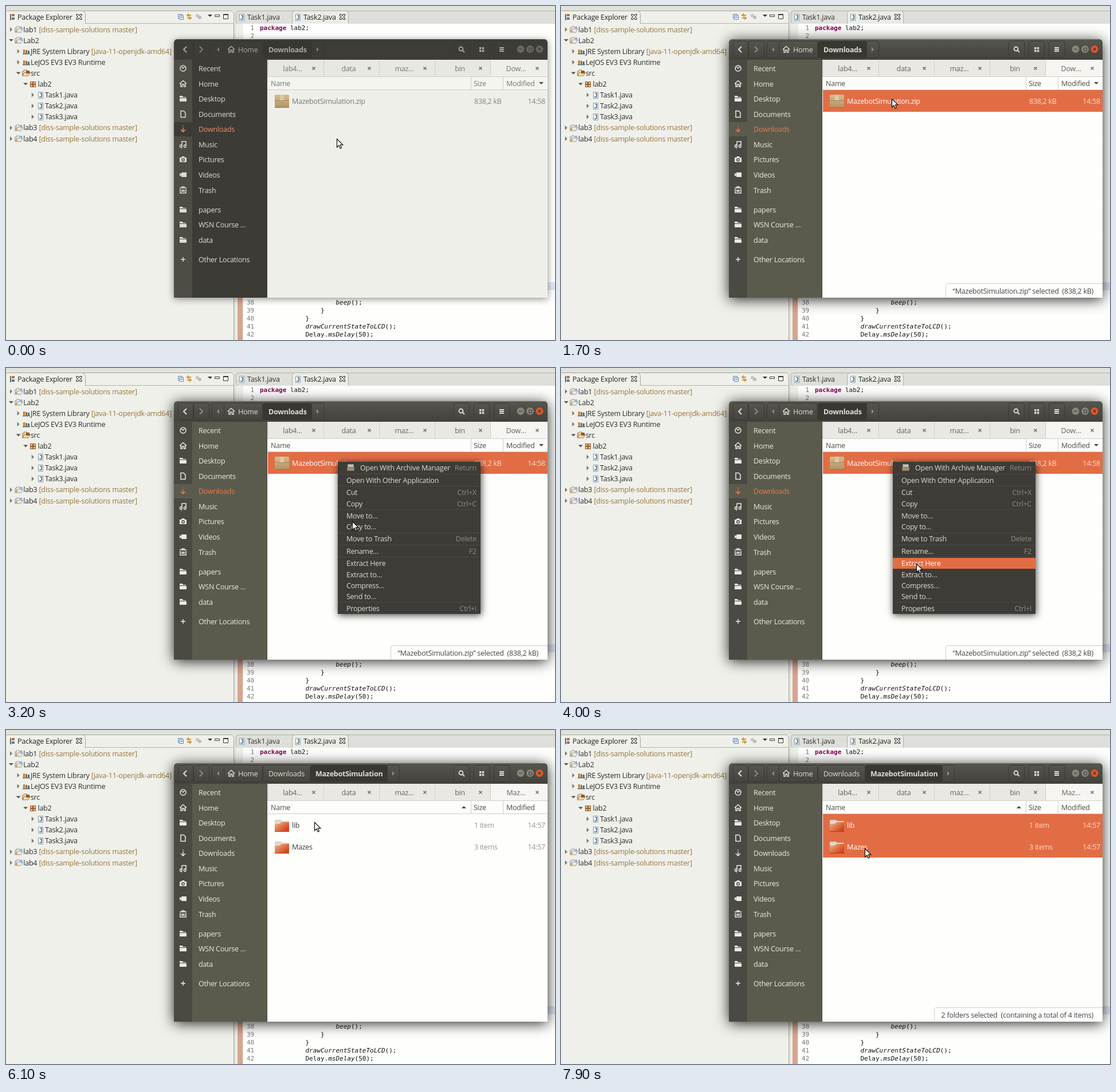
Write an HTML page with a canvas that moves like this. It is 958x584 px and loops after 8000 ms.

```html
<!DOCTYPE html>
<html lang="en">
<head>
<meta charset="utf-8">
<title>Extracting an archive</title>
<style>
html, body { margin: 0; width: 100%; height: 100%; overflow: hidden; background: #e2e2dd; }
canvas { display: block; }
</style>
</head>
<body>
<canvas id="stage" width="958" height="584"></canvas>
<script>
const ctx = document.getElementById('stage').getContext('2d');
const LOOP = 8000, STEP = 100, ORANGE = '#e26d45';

// Pointer path: time, x, y
const POINTER = [
  [200, 577, 232], [400, 577, 245], [500, 577, 245], [800, 531, 212], [1200, 577, 162],
  [2700, 577, 162], [3000, 592, 245], [3100, 592, 245], [3200, 604, 268], [3600, 620, 354],
  [3700, 620, 354], [3800, 620, 342], [4600, 620, 342], [5000, 547, 205], [5100, 547, 205],
  [5400, 545, 166], [6000, 545, 166], [6100, 538, 161], [6600, 508, 167], [6800, 508, 167],
  [7100, 530, 212], [7300, 530, 212], [7500, 530, 207]
];

// Icon outlines around their centre; the second entry marks filled ones
const ICONS = {
  clock: ['M5 0A5 5 0 1 1-5 0 5 5 0 1 1 5 0M-2.5-2.5 0 0 2.5-2.5'],
  home: ['M-6 0 0-5.5 6 0M-4-1V5H-1.5V1H1.5V5H4V-1'],
  folder: ['M-6-5H-1L0-3H5V-2H-6ZM-6-1H6V5H-6Z', 1],
  doc: ['M-4-5.5H1L4-2.5V5.5H-4Z'],
  down: ['M0-6V-4.5M0-2.5V4M-4 1 0 5 4 1'],
  music: ['M-2 3A1.8 1.8 0 1 1-5.5 3 1.8 1.8 0 1 1-2 3V-5H5V3A1.8 1.8 0 1 1 1.5 3 1.8 1.8 0 1 1 5 3'],
  camera: ['M-6-3H-3L-2-5H2L3-3H6V5H-6ZM3 1A3 3 0 1 0-3 1 3 3 0 1 0 3 1M1.5 1A1.5 1.5 0 1 0-1.5 1 1.5 1.5 0 1 0 1.5 1', 1],
  video: ['M-3-4H6V4H-3V1L-6 3V-3L-3-1Z', 1],
  trash: ['M-6-4H6M-2-4V-6H2V-4M-5-2V5H5V-2M-2-1V3M0-1V3M2-1V3'],
  plus: ['M-4 0H4M0-4V4'],
  search: ['M2.5-1A3.5 3.5 0 1 1-4.5-1 3.5 3.5 0 1 1 2.5-1M1.5 1.5 5 5'],
  grid: ['M-4-4h3.4v3.4h-3.4zM.8-4h3.4v3.4h-3.4zM-4 .8h3.4v3.4h-3.4zM.8.8h3.4v3.4h-3.4z', 1],
  menu: ['M-4-3H4M-4 0H4M-4 3H4'],
  back: ['M2-5-3 0 2 5'],
  next: ['M-2-5 3 0-2 5'],
  left: ['M2-4-2 0 2 4Z', 1],
  right: ['M-2-4 2 0-2 4Z', 1],
  up: ['M-4 2 0-2 4 2Z', 1],
  drop: ['M-4-2 0 2 4-2Z', 1],
  cross: ['M-2.5-2.5 2.5 2.5M2.5-2.5-2.5 2.5'],
  closeTab: ['M-4.5-4.5H-2L0-2.2 2-4.5H4.5V-2.5L2.2 0 4.5 2.5V4.5H2L0 2.2-2 4.5H-4.5V2.5L-2.2 0-4.5-2.5Z'],
  project: ['M-6 5V-3H-4L-3-5H1L2-3H5V-1M-6 5-3-1H7L4 5Z'],
  pointer: ['M0 0V14.5L3.4 11.3 5.6 16.5 8 15.5 5.8 10.4H10.4Z', 1]
};
for (const k in ICONS) ICONS[k][0] = new Path2D(ICONS[k][0]);

const SIDEBAR = [
  ['clock', 'Recent', 109], ['home', 'Home', 136], ['folder', 'Desktop', 162], ['doc', 'Documents', 189],
  ['down', 'Downloads', 215], ['music', 'Music', 242], ['camera', 'Pictures', 268], ['video', 'Videos', 295],
  ['trash', 'Trash', 322], ['folder', 'papers', 356], ['folder', 'WSN Course …', 382], ['folder', 'data', 409],
  ['plus', 'Other Locations', 443]
];

const MENU = [
  ['Open With Archive Manager', 174, 'Return'], ['Open With Other Application', 196], ['Cut', 217, 'Ctrl+X'],
  ['Copy', 237, 'Ctrl+C'], ['Move to…', 258], ['Copy to…', 277], ['Move to Trash', 298, 'Delete'],
  ['Rename…', 320, 'F2'], ['Extract Here', 341], ['Extract to…', 361], ['Compress…', 380],
  ['Send to…', 399], ['Properties', 420, 'Ctrl+I']
];

const BRANCH = '[diss-sample-solutions master]';
// depth, kind, open, label, suffix
const TREE = [
  [0, 'project', 0, 'lab1', BRANCH], [0, 'project', 1, 'Lab2'],
  [1, 'library', 0, 'JRE System Library', '[java-11-openjdk-amd64]'], [1, 'library', 0, 'LeJOS EV3 EV3 Runtime'],
  [1, 'source', 1, 'src'], [2, 'package', 1, 'lab2'],
  [3, 'java', 0, 'Task1.java'], [3, 'java', 0, 'Task2.java'], [3, 'java', 0, 'Task3.java'],
  [0, 'project', 0, 'lab3', BRANCH], [0, 'project', 0, 'lab4', BRANCH]
];

function rect(x, y, w, h, fill) {
  ctx.fillStyle = fill;
  ctx.fillRect(x, y, w, h);
}

function frame(x, y, w, h, stroke, fill, radius = 0) {
  ctx.beginPath();
  ctx.roundRect(x + .5, y + .5, w - 1, h - 1, radius);
  if (fill) { ctx.fillStyle = fill; ctx.fill(); }
  ctx.lineWidth = 1;
  ctx.strokeStyle = stroke;
  ctx.stroke();
}

function disc(x, y, r, fill) {
  ctx.fillStyle = fill;
  ctx.beginPath();
  ctx.arc(x, y, r, 0, 7);
  ctx.fill();
}

function fade(y0, y1, top, bottom) {
  const g = ctx.createLinearGradient(0, y0, 0, y1);
  g.addColorStop(0, top);
  g.addColorStop(1, bottom);
  return g;
}

function setFont(align = 'left', weight = '') {
  ctx.font = weight + ' 12.5px "Open Sans", sans-serif';
  ctx.letterSpacing = '-0.25px';
  ctx.textAlign = align;
}

// Text centred vertically on y
function text(s, x, y, fill, align, weight) {
  setFont(align, weight);
  ctx.fillStyle = fill;
  ctx.fillText(s, x, y + 4.5);
  return ctx.measureText(s).width;
}

function code(s, x, y, fill = '#111', style = '') {
  ctx.font = style + ' 11px "DejaVu Sans Mono", monospace';
  ctx.letterSpacing = '0px';
  ctx.textAlign = 'left';
  ctx.fillStyle = fill;
  ctx.fillText(s, x, y + 4);
  return x + ctx.measureText(s).width;
}

function icon(name, x, y, color, width = 1.4) {
  const [path, filled] = ICONS[name];
  ctx.save();
  ctx.translate(x, y);
  ctx.fillStyle = ctx.strokeStyle = color;
  ctx.lineWidth = width;
  if (filled) ctx.fill(path, 'evenodd'); else ctx.stroke(path);
  ctx.restore();
}

function treeIcon(kind, x, y) {
  if (kind === 'java') {
    frame(x - 4, y - 6, 9, 12, '#8b98a2', '#fbfcfa');
    code('J', x - 2.5, y, '#39658f', 'bold');
  } else if (kind === 'package') {
    rect(x - 5, y - 5, 10, 10, '#9a5a2c');
    for (let i = 0; i < 4; i++) rect(x - 4 + i % 2 * 5, y - 4 + (i >> 1) * 5, 3, 3, '#e6bd8b');
  } else if (kind === 'library') {
    ['#c08137', '#a06a35', '#3f7486'].forEach((c, i) => rect(x - 5 + i * 4, y - 3 + i, 3, 8 - i, c));
    rect(x - 6, y + 4, 13, 1.5, '#5f6f7c');
  } else if (kind === 'source') {
    icon('project', x, y, '#a9702e', 1.2);
    rect(x - 2, y, 7, 4, '#f3d79b');
    rect(x, y - 4, 6, 5, '#8d5930');
  } else {
    icon('project', x, y, '#8b93a0', 1.1);
    rect(x - 2, y, 7, 4, '#e6ebf0');
    rect(x - 6, y + 1, 4, 4, '#d9a45a');
    rect(x + 3, y - 5, 3, 3, '#86a6d0');
  }
}

function drawExplorer() {
  rect(0, 8, 398, 576, '#f0f0eb');
  frame(-1, 8, 399, 600, '#a5a59f', '', 5);
  rect(138, 30, 259, 1, '#b5b5ae');
  frame(-5, 8, 144, 40, '#a5a59f', '#f0f0eb', 6);
  rect(1, 31, 396, 18, '#f0f0eb');
  rect(7, 14, 2, 11, '#666');
  rect(10, 14, 5, 4, '#b07432');
  rect(10, 20, 5, 4, '#5276a8');
  text('Package Explorer', 20, 19.5, '#222');
  icon('closeTab', 127.5, 19, '#333', 1.1);

  frame(300, 14, 8, 8, '#5c86b5', '#fff');
  frame(302, 16, 8, 8, '#5c86b5', '#e8f1fb');
  rect(304, 19, 4, 1, '#285a92');
  icon('left', 317, 16, '#cf9a32');
  icon('right', 322, 21, '#cf9a32');
  rect(315, 15, 8, 2, '#cf9a32');
  rect(316, 20, 8, 2, '#cf9a32');
  disc(334, 17, 3, '#c6c6c6');
  disc(338, 20, 3, '#bcb8cb');
  icon('drop', 356, 17, '#333');
  frame(364, 15, 9, 4, '#333', '#fff');
  frame(379, 14, 9, 9, '#333', '#fff');
  rect(379, 14, 9, 2, '#333');

  TREE.forEach(([depth, kind, open, label, suffix], i) => {
    const x = 9 + depth * 12.6, y = 41 + i * 19.1;
    icon(open ? 'drop' : 'right', x, y, open ? '#55554e' : '#77776e');
    treeIcon(kind, Math.round(x + 13), Math.round(y));
    const w = text(label, x + 21.3, y, '#2b2b2b');
    if (suffix) text(suffix, x + 24.5 + w, y, '#94783c');
  });
}

function drawEditor() {
  rect(401, 8, 557, 576, '#fefefc');
  rect(401, 8, 557, 23, '#dedfda');
  frame(401, 8, 600, 24, '#b0b0aa', '', 5);
  frame(499, 8, 99, 30, '#b0b0aa', '#ecece6', 5);
  rect(402, 31, 556, 10, '#fefefc');
  treeIcon('java', 411, 20);
  text('Task1.java', 421, 19.5, '#333');
  treeIcon('java', 509, 20);
  text('Task2.java', 519, 19.5, '#222');
  icon('closeTab', 587, 19, '#333', 1.1);

  rect(401, 31, 13, 553, '#efefea');
  rect(404, 80, 9, 504, '#dba994');
  for (let y = 81; y < 584; y += 3) rect(404, y, 9, 1, '#cf9a85');
  rect(414, 483, 544, 14, '#dfe7f2');
  [1, 2, 38, 39, 40, 41, 42].forEach(n => {
    const y = n < 3 ? 24 + n * 14 : 518 + (n - 38) * 14;
    code(String(n).padStart(2), 420, y, '#787878');
  });
  code(' lab2;', code('package', 443, 38, '#7f0055', 'bold'), 38);
  const col = n => 443 + n * 6.62;
  code('();', code('beep', col(20), 518, '#111', 'italic'), 518);
  code('}', col(16), 532);
  code('}', col(12), 546);
  code('();', code('drawCurrentStateToLCD', col(12), 560, '#111', 'italic'), 560);
  code('(50);', code('msDelay', code('Delay.', col(12), 574), 574, '#111', 'italic'), 574);
  code('}', col(8), 588);
}

function fileIcon(folder, x, y) {
  const shape = (sx, sy, w, h, fill) => {
    ctx.beginPath();
    ctx.roundRect(sx, sy, w, h, 2);
    ctx.fillStyle = fill;
    ctx.fill();
  };
  if (folder) {
    shape(x + 1, y - 9, 12, 8, '#d8cdbf');
    shape(x + 1, y - 7, 25, 12, '#e3d9cb');
    const front = ctx.createLinearGradient(x, y - 5, x + 14, y + 14);
    front.addColorStop(0, '#efb98f');
    front.addColorStop(1, '#d1481f');
    ctx.beginPath();
    ctx.moveTo(x + 1, y - 2);
    ctx.lineTo(x + 10, y - 2);
    ctx.lineTo(x + 13, y - 5);
    ctx.lineTo(x + 26, y - 5);
    ctx.lineTo(x + 26, y + 12);
    ctx.lineTo(x + 1, y + 12);
    ctx.fillStyle = front;
    ctx.fill();
    rect(x + 1, y + 11, 25, 1, '#b23d1c');
  } else {
    shape(x + 1, y - 11, 25, 23, fade(y - 11, y + 12, '#d2bb95', '#b5935f'));
    rect(x + 1, y - 1, 25, 1, '#a3845a');
    rect(x + 10, y - 11, 7, 10, '#dcc8a4');
    rect(x + 1, y + 11, 25, 1, '#94744a');
  }
}

function drawTitle(focus, inside) {
  ctx.save();
  ctx.shadowColor = focus ? 'rgba(0,0,0,.85)' : 'rgba(0,0,0,.45)';
  ctx.shadowBlur = focus ? 24 : 13;
  ctx.shadowOffsetY = focus ? 3 : 2;
  ctx.fillStyle = focus ? fade(58, 94, '#56554e', '#42413c') : '#3d3c37';
  ctx.beginPath();
  ctx.roundRect(293, 58, 652, 452, [6, 6, 0, 0]);
  ctx.fill();
  ctx.restore();
  rect(298, 58, 642, 1, focus ? '#6b6a62' : '#4a4943');

  const ink = focus ? '#e2ded5' : '#a9a79e', dim = focus ? '#8e8d84' : '#7d7c74';
  const edge = focus ? '#3a3934' : '#373632';
  const button = (x, w, active) => frame(x, 61, w, 30, edge, active ? '#383732' : focus ? fade(61, 91, '#55544d', '#45443e') : '', 3);
  button(300, 27);
  button(327, 28);
  button(359, 22);
  button(380, 68);
  button(448, inside ? 83 : 86, !inside);
  if (inside) button(531, 135, true);
  const end = inside ? 665 : 533;
  button(end, 22);
  icon('back', 313, 76, ink, 2);
  icon('next', 340, 76, dim, 2);
  icon('left', 370, 76, dim);
  icon('home', 393, 76, ink);
  text('Home', 405, 76, ink);
  text('Downloads', 458, 76, ink, 'left', inside ? '' : 'bold');
  if (inside) text('MazebotSimulation', 540, 76, ink, 'left', 'bold');
  icon('right', end + 11, 76, dim);
  [['search', 795], ['grid', 830], ['menu', 865]].forEach(([name, x]) => {
    button(x - 14, 28);
    icon(name, x, 76, ink, 1.8);
  });
  const knob = focus ? '#85847b' : '#68675f', mark = '#3d3c37';
  disc(898, 75.5, 6.5, knob);
  disc(914.5, 75.5, 6.5, knob);
  disc(931, 75.5, 6.5, focus ? '#e4552c' : knob);
  rect(895, 75, 6, 1, mark);
  frame(912, 73, 6, 6, mark);
  icon('cross', 931, 75.5, mark, 1.2);
}

function drawSidebar(focus, inside) {
  const base = focus ? '#5b5b4d' : '#3c3b35';
  rect(293, 94, 163, 416, base);
  rect(293, 94, 32, 416, focus ? '#4a4942' : '#4d4c45');
  rect(455, 94, 1, 416, '#45443d');
  SIDEBAR.forEach(([name, label, y]) => {
    const active = label === 'Downloads' && !inside;
    if (active) rect(293, y - 12, 32, 25, base);
    const ink = active ? (focus ? '#f0764c' : '#e58f74') : focus ? '#eeeae2' : '#e0ddd5';
    icon(name, 309, y, ink, 1.5);
    text(label, 336, y, ink);
  });
}

function drawList(focus, inside, rows) {
  rect(456, 94, 489, 416, focus ? '#fefefb' : '#efefea');
  rect(456, 94, 489, 30, focus ? '#e9e8e3' : '#e8e8e2');
  rect(846, 94, 99, 30, focus ? '#f6f5f2' : '#efefea');
  const ink = focus ? '#4c4c48' : '#777771', line = '#d0cfc8';
  ['lab4…', 'data', 'maz…', 'bin', inside ? 'Maz…' : 'Dow…'].forEach((label, i) => {
    text(label, [500, 598, 695, 792, 890][i], 109, focus ? '#66665f' : '#777771', 'center');
    icon('cross', i < 4 ? 537 + i * 97 : 927, 109, '#66665f', 1.3);
    rect(457 + i * 97.2 | 0, 95, 1, 28, line);
  });
  rect(456, 123, 489, 1, line);
  rect(456, 124, 489, 22, focus ? '#fdfdfb' : '#f4f4f0');
  rect(456, 146, 489, 1, line);
  rect(811, 124, 1, 22, line);
  rect(867, 124, 1, 22, line);
  text('Name', 462, 135, ink);
  text('Size', 816, 135, ink);
  text('Modified', 873, 135, ink);
  if (inside) icon('up', 799, 135, '#444'); else icon('drop', 934, 135, '#444');

  rows.forEach(([name, size, time, selected], i) => {
    const y = 166 + i * 38;
    if (selected) rect(457, y - 19, 488, 38, ORANGE);
    fileIcon(!name.endsWith('.zip'), 468, y);
    const faint = selected ? '#fbdccf' : focus ? '#96958e' : '#84847e';
    text(name, 499, y, selected ? '#fff' : focus ? '#3c3c39' : '#777771');
    text(size, 817, y, faint);
    text(time, 941, y, faint, 'right');
  });
}

function drawStatus(s) {
  setFont();
  const x = Math.round(929 - ctx.measureText(s).width - 13);
  frame(x, 485, 950 - x, 30, '#cfcec8', '#fefefc', 3);
  text(s, 929, 498, '#444', 'right');
}

function drawMenu(px, py) {
  ctx.save();
  ctx.shadowColor = 'rgba(0,0,0,.75)';
  ctx.shadowBlur = 12;
  ctx.shadowOffsetX = 1;
  ctx.shadowOffsetY = 2;
  rect(579, 164, 249, 266, '#3d3c37');
  ctx.restore();
  [185, 206, 247, 288, 309, 330, 409].forEach(y => rect(580, y, 247, 1, '#4a4943'));
  MENU.forEach(([label, y, key], i) => {
    const hover = px > 579 && Math.abs(py - y) < 9;
    if (hover) rect(579, y - 9, 249, 19, ORANGE);
    text(label, i ? 594 : 618, y, hover ? '#fff' : '#dfdbd2');
    if (key) text(key, 821, y, hover ? '#fff' : '#8b8a82', 'right');
  });
  frame(596, 168, 11, 6, '#8b8b86', '#c6c4bc');
  frame(595, 173, 13, 7, '#77766f', '#a98b62');
}

function pointerAt(t) {
  const i = POINTER.findIndex(k => k[0] > t);
  if (i < 0) return POINTER.at(-1).slice(1);
  if (!i) return POINTER[0].slice(1);
  const [a, b] = [POINTER[i - 1], POINTER[i]], f = (t - a[0]) / (b[0] - a[0]);
  return [1, 2].map(n => Math.round(a[n] + (b[n] - a[n]) * f));
}

function listAt(t) {
  const zip = ['MazebotSimulation.zip', '838,2 kB', '14:58', t >= 1700 && t < 4300];
  if (t < 4300) return [zip];
  if (t < 5500) return [['MazebotSimulation', '1 item', '15:01', true], zip];
  return [['lib', '1 item', '14:57', t >= 6600], ['Mazes', '3 items', '14:57', t >= 7700]];
}

function statusAt(t) {
  if (t < 1700) return '';
  if (t < 4600) return '“MazebotSimulation.zip” selected  (838,2 kB)';
  if (t < 5500) return '“MazebotSimulation” selected  (containing 1 item)';
  if (t < 6900) return '';
  if (t < 7900) return '“lib” selected  (containing 1 item)';
  return '2 folders selected  (containing a total of 4 items)';
}

function draw(t) {
  const focus = t >= 1700, inside = t >= 5500;
  const [px, py] = pointerAt(t), status = statusAt(t);
  rect(0, 0, 958, 584, '#e2e2dd');
  drawExplorer();
  drawEditor();
  drawTitle(focus, inside);
  ctx.save();
  ctx.beginPath();
  ctx.rect(293, 94, 652, 416);
  ctx.clip();
  drawSidebar(focus, inside);
  drawList(focus, inside, listAt(t));
  if (status) drawStatus(status);
  ctx.restore();
  if (t >= 2300 && t < 4200) drawMenu(px, py);

  ctx.save();
  ctx.translate(px + .5, py + .5);
  ctx.fillStyle = '#fff';
  ctx.strokeStyle = '#111';
  ctx.lineWidth = 1.2;
  ctx.fill(ICONS.pointer[0]);
  ctx.stroke(ICONS.pointer[0]);
  ctx.restore();
}

const start = performance.now();
function tick() {
  const t = (performance.now() - start) % LOOP;
  draw(Math.floor(t / STEP) * STEP);
  requestAnimationFrame(tick);
}
tick();
</script>
</body>
</html>
```
